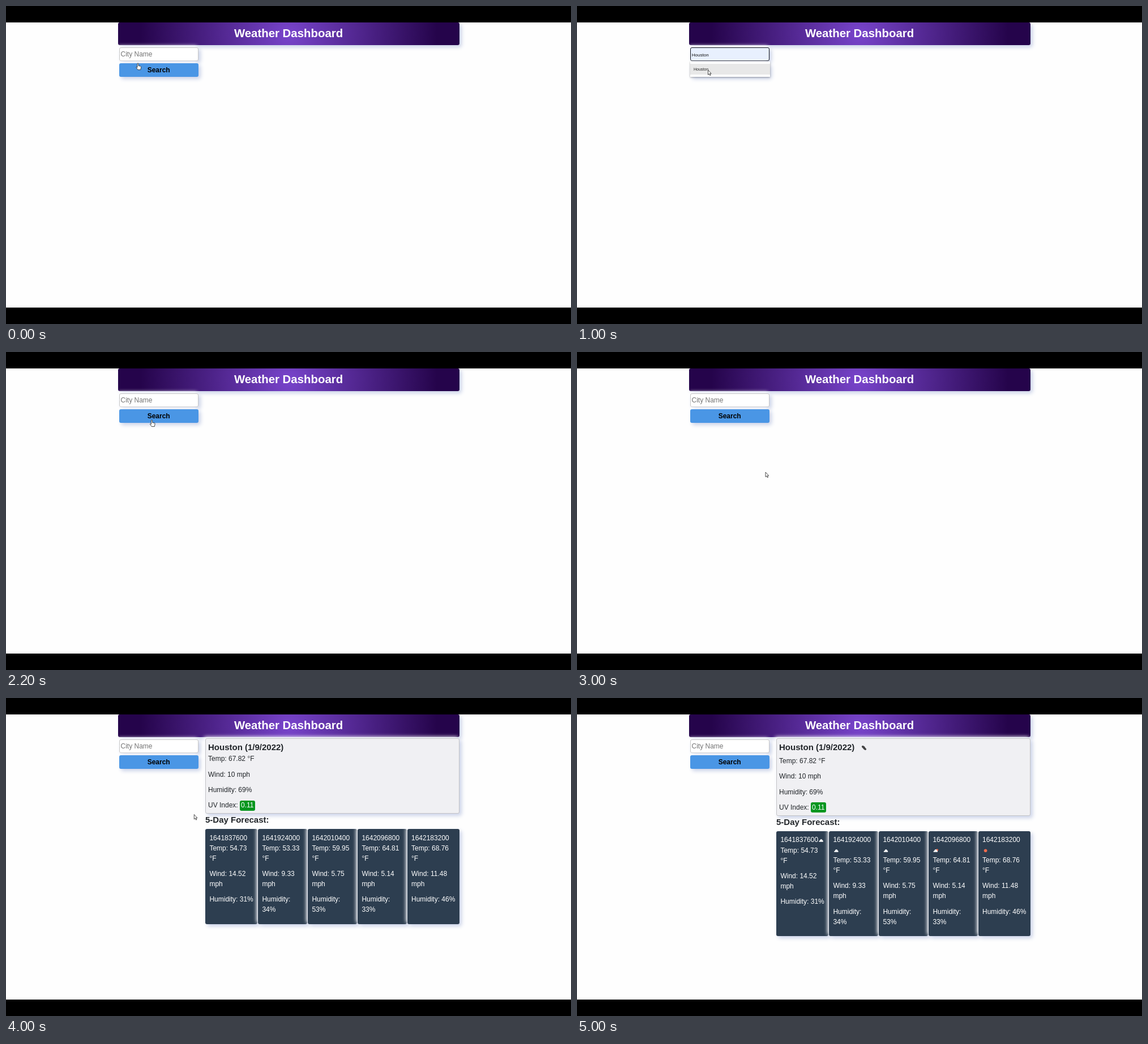
An HTML page that plays this animation: 998x561 px, repeating every 6000 ms.

```html
<!DOCTYPE html>
<html lang="en">
<head>
<meta charset="utf-8">
<title>Weather Dashboard</title>
<style>
  html, body { margin: 0; width: 100%; height: 100%; overflow: hidden; background: #000; }
  #stage { position: absolute; inset: 0; }
  #stage div { position: absolute; box-sizing: border-box; border-radius: 3px; }
  #stage .flat { border-radius: 0; }
  .raised { box-shadow: 3.6px 3.6px 7.2px #c8d0e7, -2.4px -2.4px 6px #fff; }
  .header { background: radial-gradient(circle, #7844cb, #25044b 262px); }
  .input { background: #fff; border: 1px solid #c6c6c6; }
  .focus { border: 1.6px solid #10141c; }
  .filled { background: #e8f0fe; }
  .button { background: #4a96e5; }
  .menu { background: #fff; box-shadow: 0 1px 3px #0005; }
  .today { background: #f0f0f3; border: 1px solid #c4c4c6; }
  .day { background: #2d3e50; }
  svg { position: absolute; left: 0; top: 0; font: 12px "Liberation Sans", Arial, sans-serif; }
  .bold { font-weight: bold; }
  .cursor { fill: #fff; stroke: #222; stroke-width: .8; stroke-linejoin: round; }
</style>
</head>
<body>
<div id="stage"></div>
<script>
const STEP = 200, LOOP = 6000;
const stage = document.getElementById('stage');

const cursorShapes = {
  hand: 'M-1 1a1 1 0 0 1 2 0v3.5l3.5.7q1.2.3 1.1 1.5l-.8 4.8h-5l-2.8-4q-.4-1 .7-.9l1.3.9z',
  beam: 'M-1.5-5h3M0-5v10M-1.5 5h3',
  arrow: 'M0 0v8.4l1.9-1.7 1.4 2.9 1.3-.6-1.4-2.8h2.5z'
};
// start time, shape, x, y
const cursorPath = [
  [0, 'hand', 233, 101], [200, 'beam', 235, 85], [800, 'arrow', 236, 91], [1000, 'arrow', 231.5, 113],
  [1200, 'hand', 230, 112], [1400, 'beam', 246, 92], [1600, 'beam', 246, 90], [1800, 'hand', 247, 112],
  [2200, 'hand', 257.5, 120], [2400, 'arrow', 348, 167], [2600, 'arrow', 336, 209], [2800, 'arrow', 333, 212],
  [3200, 'arrow', 333, 211], [3400, 'arrow', 333, 212], [3800, 'arrow', 333, 206], [4000, 'arrow', 332.3, 205.5],
  [4200, 'arrow', 332.3, 205], [4400, 'arrow', 350, 165], [4600, 'arrow', 376, 101], [4800, 'arrow', 423, 36],
  [5000, 'none', 0, 0]
];
// left, right, date, temperature, wind, humidity
const days = [
  [352, 444.3, 1641837600, '54.73', '14.52', 31],
  [445, 532.3, 1641924000, '53.33', '9.33', 34],
  [533, 620.3, 1642010400, '59.95', '5.75', 53],
  [621, 707.8, 1642096800, '64.81', '5.14', 33],
  [708.6, 801, 1642183200, '68.76', '11.48', 46]
];

const box = (x, y, w, h, cls, style = '') =>
  `<div class="${cls}" style="left:${x}px;top:${y}px;width:${w}px;height:${h}px;${style}"></div>`;
const text = (x, y, str, fill = '#212529', attrs = '') =>
  `<text x="${x}" y="${y}" fill="${fill}" ${attrs}>${str}</text>`;
const bold = size => `class="bold" font-size="${size}"`;
const cloud = (x, y) =>
  `<path fill="#fff" d="M${x - 3.6} ${y + 2.4}q-.6-2 1.5-2.2q.4-2.6 2.4-2.6t2.2 2.2q2 .4 1.2 2.6z"/>`;
const dot = (x, y, r) => `<circle cx="${x}" cy="${y}" r="${r}" fill="#ee6b4d"/>`;

function search(time) {
  const focused = time >= 600 && time < 2000, filled = time >= 1000 && time < 2000;
  const menu = time >= 600 && time < 1200, preview = filled && menu;
  let boxes = box(200, 73, 140, 24, `raised input ${focused ? 'focus' : ''} ${filled ? 'filled' : ''}`)
    + box(200, 101, 140, 24, 'raised button');
  let texts = preview ? text(202.8, 89, 'Houston', '#111', 'font-size="8"')
    : filled ? text(202.8, 89, 'Houston', '#111') : text(202.5, 89, 'City Name', '#757575');
  if (menu) {
    boxes += box(200, 98, 140.5, 27, 'flat menu');
    if (preview) boxes += box(200, 101.5, 140.5, 19.5, 'flat', 'background:#e8e8e8');
    texts += text(206, 114, 'Houston', '#222', 'font-size="7"');
  } else {
    texts += text(269.7, 117.3, 'Search', '#000', bold(12) + ' text-anchor="middle"');
  }
  return [boxes, texts];
}

function results(icons) {
  const shift = icons ? 3.6 : 0;
  let boxes = box(352, 70.5, 449, 133.5 + shift, 'raised today')
    + box(412.5, 180.5 + shift, 27.5, 18, '', 'background:#05961f');
  let texts = text(357, 92, 'Houston (1/9/2022)', '#212529', bold(15))
    + text(352, 220 + shift, '5-Day Forecast:', '#212529', bold(15))
    + text(415, 193.4 + shift, '0.11', '#fff');
  ['Temp: 67.82 °F', 'Wind: 10 mph', 'Humidity: 69%', 'UV Index:'].forEach((line, i) =>
    texts += text(357, 111.2 + shift + i * 27.4, line));
  if (icons) texts += '<g fill="#444" transform="translate(507 88) rotate(35)">'
    + '<ellipse cx="-1.6" cy="-.4" rx="3.3" ry="2"/><ellipse cx="2" cy=".5" rx="3" ry="1.9"/></g>';

  days.forEach(([left, right, date, temp, wind, humidity], i) => {
    const top = 231.3 + shift, x = left + 7.4, wide = i === 0 || i === 4;
    const iconRow = icons && i > 0 ? 17.7 : 0;
    boxes += box(left, top, right - left, icons ? 185.5 : 167.5, 'raised day');
    const line = (y, str) => texts += text(x, top + y, str, '#fff');
    line(19.5, date);
    const body = iconRow + 37.6;
    line(body, `Temp: ${temp}`);
    line(body + 18, '°F');
    line(body + 45.2, `Wind: ${wind}`);
    line(body + 63, 'mph');
    line(body + 90.3, wide ? `Humidity: ${humidity}%` : 'Humidity:');
    if (!wide) line(body + 108.3, `${humidity}%`);
  });
  if (icons) texts += cloud(431, 251.3) + cloud(457.8, 269.3) + cloud(545.4, 269.3)
    + dot(636, 268.3, 2) + cloud(633.2, 269.3) + dot(721.6, 269.2, 2.8);
  return [boxes, texts];
}

function render(time) {
  const [searchBoxes, searchTexts] = search(time);
  const [resultBoxes, resultTexts] = time >= 4000 ? results(time >= 4200) : ['', ''];
  const [, shape, x, y] = cursorPath.findLast(key => key[0] <= time);
  const cursor = cursorShapes[shape]
    ? `<path class="cursor" transform="translate(${x} ${y})" d="${cursorShapes[shape]}"/>` : '';
  stage.innerHTML = box(0, 28.5, 998, 503, 'flat', 'background:#fefefe')
    + box(25, 531, 178, 1, 'flat', 'background:#fefefe')
    + box(197.5, 29, 603.5, 39.7, 'raised header')
    + box(0, 0, 998, 28.5, 'flat', 'background:#000')
    + searchBoxes + resultBoxes
    + `<svg width="998" height="561">${text(499, 55.2, 'Weather Dashboard', '#fff', bold(20.4) + ' text-anchor="middle"')}`
    + `${searchTexts}${resultTexts}${cursor}</svg>`;
}

let shown = -1;
function tick() {
  const time = Math.floor(performance.now() % LOOP / STEP) * STEP;
  if (time !== shown) render(shown = time);
  requestAnimationFrame(tick);
}
tick();
</script>
</body>
</html>
```
